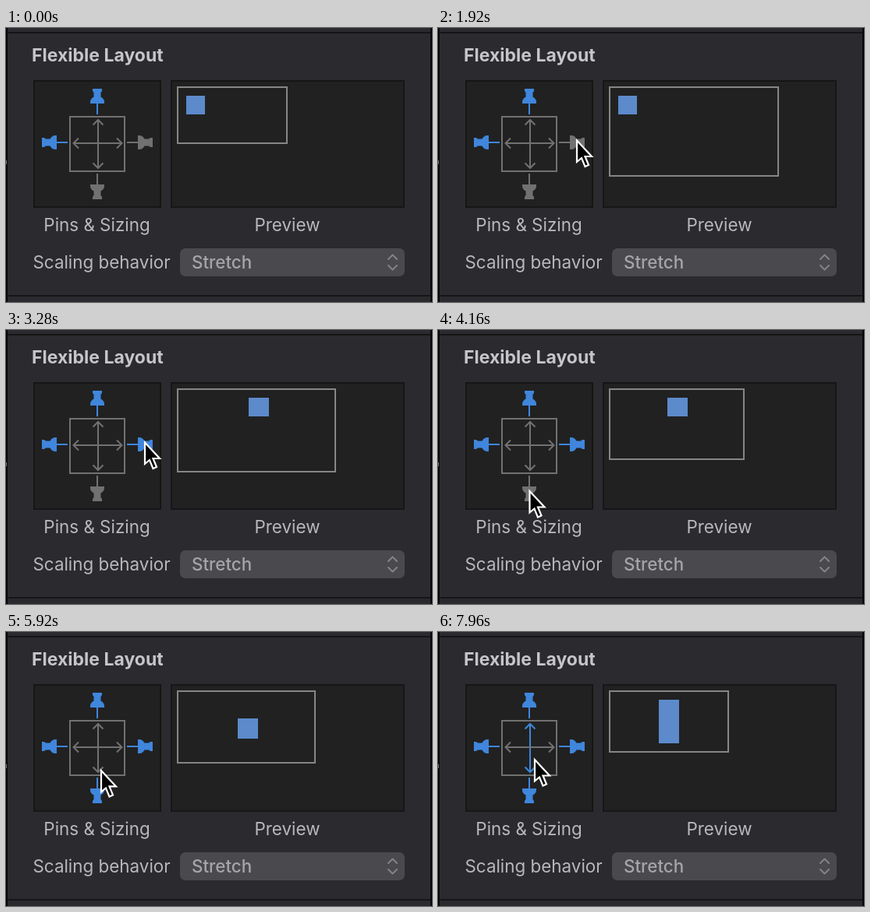
Animation, 546 px wide and 352 px high, one loop 8 s. Source, as an HTML page:

```html
<!DOCTYPE html>
<html lang="en">
<head>
<meta charset="utf-8">
<title>Flexible Layout</title>
<style>
  html, body { margin: 0; width: 100%; height: 100%; overflow: hidden; background: #2b2a2e; }
  svg { display: block; width: 546px; height: 352px; font: 22.4px Inter, "Open Sans", sans-serif; }
  .panel { fill: #212121; stroke: #161616; stroke-width: 2; }
  .label { fill: #b9b8bc; }
  .gray { color: #717171; }
  .blue { color: #3f86dc; }
  .line { fill: none; stroke: currentColor; stroke-width: 2; }
</style>
</head>
<body>
<svg viewBox="0 0 546 352">
  <defs>
    <g id="pin" fill="currentColor">
      <path d="M-6-71H6V-68L4.500-66V-60.500Q9-58 9-54V-52H-9V-54Q-9-58-4.500-60.500V-66L-6-68Z"/>
      <path d="M-1-52H1V-38H-1Z"/>
    </g>
    <path id="arrow" class="line" d="M-31 0H31M-24.500-6.500L-31 0L-24.500 6.500M24.500-6.500L31 0L24.500 6.500"/>
  </defs>

  <rect width="546" height="352" fill="#2b2a2e"/>
  <path d="M0 6H546M0 344H546" stroke="#151517" stroke-width="2"/>
  <path d="M1 0V352M545 0V352" stroke="#050506" stroke-width="2"/>
  <path d="M0 170H1V175H0Z" fill="#777"/>

  <text x="33" y="43" font-size="23" font-weight="700" fill="#c6c5c9">Flexible Layout</text>
  <rect class="panel" x="36" y="68" width="162" height="162"/>
  <rect class="panel" x="212" y="68" width="298" height="162"/>
  <g class="label">
    <text x="116.5" y="261" text-anchor="middle">Pins &amp; Sizing</text>
    <text x="360.5" y="261" text-anchor="middle">Preview</text>
    <text x="34.5" y="309">Scaling behavior</text>
  </g>
  <rect x="223" y="283" width="288" height="36" rx="7" fill="#4a494d"/>
  <text x="238" y="309" font-weight="500" fill="#a6a5a9">Stretch</text>
  <path d="M490 297L495.500 291.500L501 297M490 305L495.500 310.500L501 305" fill="none"
        stroke="#848387" stroke-width="2" stroke-linecap="round" stroke-linejoin="round"/>

  <rect class="gray line" x="82" y="114" width="70" height="70"/>
  <use href="#pin" class="blue" transform="translate(117 149)"/>
  <use href="#pin" class="blue" transform="translate(117 147) rotate(-90)"/>
  <use href="#pin" id="rightPin" transform="translate(117 147) rotate(90)"/>
  <use href="#pin" id="bottomPin" transform="translate(117 149) rotate(180)"/>
  <use href="#arrow" id="heightArrow" transform="translate(118 149) rotate(90)"/>
  <use href="#arrow" class="gray" transform="translate(117.500 148)"/>

  <g transform="translate(220 76)">
    <rect id="child" fill="#5c8aca"/>
    <rect id="parent" fill="none" stroke="#868686" stroke-width="2"/>
  </g>

  <path id="cursor" d="M0 0V27.500L6 22.500L10.500 33.500L15 31.500L10.500 20.500H19Z"
        fill="#000" stroke="#fff" stroke-width="2.200"/>
</svg>
<script>
  const LOOP = 8000, STEP = 40;
  const RESIZE_START = 870, RESIZE_HALF = 900;
  const RIGHT_CLICK = 2560, BOTTOM_CLICK = 4600, HEIGHT_CLICK = 6400;

  // Cursor stops: time, x, y
  const cursorPath = [
    [300, 262, 356], [1400, 178, 144.5], [3400, 178, 144.5], [4100, 117.5, 207],
    [5500, 117.5, 207], [5900, 122, 178], [6300, 122, 172], [7500, 122, 172], [7900, 124, 164]
  ];

  const byId = id => document.getElementById(id);
  const even = v => Math.round((v - 0.1) / 2) * 2;
  const smooth = u => u * u * (3 - 2 * u);

  function setAttrs(id, attrs) {
    for (const name in attrs) byId(id).setAttribute(name, attrs[name]);
  }

  function cursorAt(t) {
    const next = cursorPath.findIndex(stop => stop[0] > t);
    if (next === 0) return cursorPath[0].slice(1);
    if (next < 0) return cursorPath[cursorPath.length - 1].slice(1);
    const [t0, x0, y0] = cursorPath[next - 1], [t1, x1, y1] = cursorPath[next];
    const u = smooth((t - t0) / (t1 - t0));
    return [x0 + (x1 - x0) * u, y0 + (y1 - y0) * u];
  }

  function growth(t) {
    if (t < RESIZE_START) return 0;
    const phase = (t - RESIZE_START) / RESIZE_HALF % 2;
    return 92 * (1 - Math.abs(1 - phase));
  }

  function draw(now) {
    const t = Math.floor(now % LOOP / STEP) * STEP;
    const right = t >= RIGHT_CLICK, bottom = t >= BOTTOM_CLICK, tall = t >= HEIGHT_CLICK;
    const grow = growth(t);
    const width = even(140 + grow), height = even(73 + grow * 0.541);

    setAttrs("parent", { width, height });
    setAttrs("child", {
      x: right ? Math.round(63 + (width - 152) * 0.564) : 11,
      y: bottom && !tall ? Math.round(45 + (height - 108) * 0.625) : 11,
      width: right ? 26 : 24,
      height: tall ? height - 22 : bottom ? 26 : 24
    });
    setAttrs("rightPin", { class: right ? "blue" : "gray" });
    setAttrs("bottomPin", { class: bottom ? "blue" : "gray" });
    setAttrs("heightArrow", { class: tall ? "blue" : "gray" });
    setAttrs("cursor", { transform: `translate(${cursorAt(t)})` });
  }

  const start = performance.now();
  function tick() {
    draw(performance.now() - start);
    requestAnimationFrame(tick);
  }
  tick();
</script>
</body>
</html>
```
